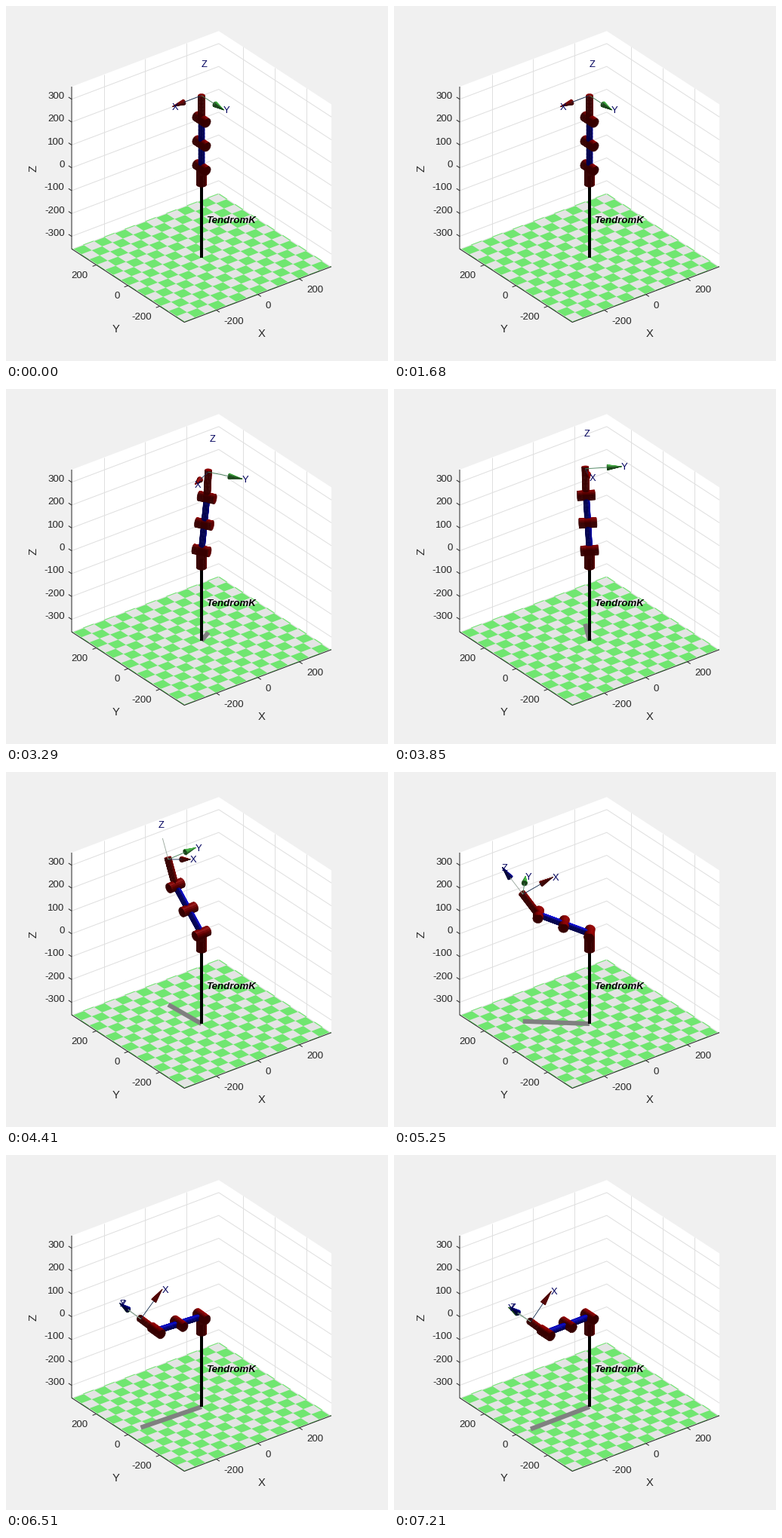
Write a matplotlib script that moves like this. It is 506x471 px and loops after 7770 ms.

```python
import math

import numpy as np
import matplotlib.pyplot as plt
from matplotlib.animation import FuncAnimation
from matplotlib.collections import PolyCollection
from matplotlib.patches import Polygon

W, H, FRAMES, TICK = 506, 471, 111, 70
FIRST_MOVE, TICKS_PER_STEP, PHASE, STEPS = 24, 1.645, 0.4865, 49

# Orthographic projection: world millimetres to stage pixels
REACH = 355
PROJ = np.array([[194.8, -149.2, 0], [-73.8, -97.3, -215.3]]) / (2 * REACH)
CENTRE = np.array([258.5, 225.9])
VIEW = np.array([-0.527, -0.687, 0.5])
LIGHT = np.array([1, 0, 1]) / math.sqrt(2)

RED, BLUE, GREEN = (0.7, 0, 0), (0, 0, 1), (0.3, 0.85, 0.3)
CONE_COLORS = ((0.75, 0, 0), GREEN, (0, 0, 0.7))
LINK, AXIS_LEN, CONE_LEN = 105, 140, 55
UP = np.array([0, 0, 1.0])


def project(points):
    return CENTRE + np.asarray(points, float) @ PROJ.T


def shade(color, normal):
    facing = max(0, normal @ LIGHT)
    mirror = 2 * (normal @ LIGHT) * normal - LIGHT
    shine = 0.12 * max(0, mirror @ VIEW) ** 10 if facing else 0
    return np.clip(np.array(color) * (0.3 + 0.6 * facing) + shine, 0, 1)


def unit(v):
    return v / np.linalg.norm(v)


def ring(axis, sides):
    ref = np.array([0, 1.0, 0]) if abs(axis[1]) < 0.8 else np.array([1.0, 0, 0])
    u = unit(np.cross(axis, ref))
    v = np.cross(axis, u)
    angles = np.arange(sides + 1) * 2 * math.pi / sides
    return np.outer(np.cos(angles), u) + np.outer(np.sin(angles), v)


def facet(out, points, normal, color):
    if normal @ VIEW > 0:
        points = np.array(points)
        out.append((points.mean(axis=0) @ VIEW, project(points), shade(color, normal)))


def cylinder(out, start, end, radius, color, parts=1, sides=20):
    axis = unit(end - start)
    rim = ring(axis, sides)
    cuts = [start + (end - start) * i / parts for i in range(parts + 1)]
    for a, b in zip(rim[:-1], rim[1:]):
        normal = unit(a + b)
        for p, q in zip(cuts[:-1], cuts[1:]):
            facet(out, (p + a * radius, p + b * radius,
                        q + b * radius, q + a * radius), normal, color)
    facet(out, end + rim * radius, axis, color)
    facet(out, start + rim * radius, -axis, color)


def cone(out, base, tip, radius, color):
    axis = unit(tip - base)
    rim = ring(axis, 12)
    slope = radius / np.linalg.norm(tip - base)
    for a, b in zip(rim[:-1], rim[1:]):
        facet(out, (base + a * radius, base + b * radius, tip),
              unit(unit(a + b) + slope * axis), color)
    facet(out, base + rim * radius, -axis, color)


def progress(frame):
    """Quintic time scaling, sampled at the discrete trajectory steps."""
    done = sum(FIRST_MOVE + math.floor(TICKS_PER_STEP * k + PHASE) <= frame
               for k in range(STEPS))
    u = done / STEPS
    return u ** 3 * (10 - 15 * u + 6 * u * u)


def arm(s):
    """Joint positions and the tool frame for trajectory fraction s."""
    azimuth, tilt, tool_tilt = math.pi * s, math.pi / 2 * s, math.pi / 4 * s
    out = np.array([math.cos(azimuth), math.sin(azimuth), 0])
    side = np.array([-out[1], out[0], 0])
    along = math.sin(tilt) * out + math.cos(tilt) * UP
    tool_z = math.sin(tool_tilt) * out + math.cos(tool_tilt) * UP
    tool_x = math.sin(tool_tilt) * UP - math.cos(tool_tilt) * out
    shoulder = 40 * UP
    elbow = shoulder + LINK * along
    wrist = elbow + LINK * along
    tip = wrist + LINK * tool_z
    return (shoulder, elbow, wrist, tip), side, (tool_x, -side, tool_z)


# The small excess keeps rounding from losing a pixel
fig = plt.figure(figsize=((W + 0.01) / 100, (H + 0.01) / 100), dpi=100,
                 facecolor="#f0f0f0")
ax = fig.add_axes([0, 0, 1, 1])
ax.set_xlim(-0.5, W - 0.5)
ax.set_ylim(H - 0.5, -0.5)
ax.axis("off")


def line(points, color, width, z):
    xy = project(points)
    return ax.plot(xy[:, 0], xy[:, 1], color=color, lw=width * 0.72, zorder=z,
                   solid_capstyle="butt")[0]


def text(x, y, label, px=13.3, color="#262626", ha="center", **style):
    return ax.text(x, y, label, fontsize=px * 0.72, color=color, ha=ha,
                   va="center", family="Liberation Sans", zorder=8, **style)


def draw_stage():
    r = REACH
    outline = [(-r, r, r), (r, r, r), (r, -r, r), (r, -r, -r), (-r, -r, -r), (-r, r, -r)]
    ax.add_patch(Polygon(project(outline), fc="white", ec="none", zorder=0))

    for v in range(-300, 301, 100):
        line([(-r, r, v), (r, r, v), (r, -r, v)], "#dfdfdf", 1, 1)
    for v in (-200, 0, 200):
        line([(v, r, -r), (v, r, r)], "#dfdfdf", 1, 1)
        line([(r, v, -r), (r, v, r)], "#dfdfdf", 1, 1)

    floor = Polygon(project([(-r, -r, -r), (r, -r, -r), (r, r, -r), (-r, r, -r)]),
                    fc="#e4e4e4", ec="none", zorder=2)
    ax.add_patch(floor)
    tiles = [project([(x, y, -r), (x + 50, y, -r), (x + 50, y + 50, -r), (x, y + 50, -r)])
             for x in range(-400, 400, 50) for y in range(-400, 400, 50)
             if (x + y) // 50 % 2]
    checker = PolyCollection(tiles, facecolors="#70e670", edgecolors="none", zorder=2.1)
    ax.add_collection(checker)
    checker.set_clip_path(floor)

    dark = "#262626"
    line([(-r, r, r), (-r, r, -r), (-r, -r, -r), (r, -r, -r)], dark, 1, 3)
    for v in (-200, 0, 200):
        line([(v, -r, -r), (v, -r - 20, -r)], dark, 1, 3)
        line([(-r, v, -r), (-r - 18, v, -r)], dark, 1, 3)
        x, y = project((v, -r, -r))
        text(x + 9.5, y + 15.5, str(v), ha="left")
        x, y = project((-r, v, -r))
        text(x - 11, y + 14.5, str(v), ha="right")
    for v in range(-300, 301, 100):
        line([(-r, r, v), (-r, r + 20, v)], dark, 1, 3)
        text(77, project((-r, r, v))[1] - 3.7, str(v), ha="right")

    text(338, 434, "X", 14.7)
    text(145, 428, "Y", 14.7)
    text(36, 215, "Z", 14.7, rotation=90)
    text(265, 284, "TendromK", color="black", ha="left", weight="bold", style="italic")
    line([(0, 0, -r), (0, 0, 0)], "black", 4, 4)


draw_stage()
shadow = line([(0, 0, -REACH)] * 2, "#808080", 6, 3.5)
body = PolyCollection([], linewidths=0.4, zorder=5)
ax.add_collection(body)
axis_lines = [line([(0, 0, 0)] * 2, c, 0.9, 6) for c in ("#1c3454", "#47805a", "#9aa89e")]
axis_labels = [text(0, 0, name, 13, "#00005c", "left") for name in "XYZ"]


def update(frame):
    s = progress(frame)
    (shoulder, elbow, wrist, tip), side, tool_axes = arm(s)
    facets = []

    cylinder(facets, -35 * UP, 35 * UP, 19, RED, 3)
    for joint in (shoulder, elbow, wrist):
        cylinder(facets, joint - 33 * side, joint + 33 * side, 19, RED, 3)
    cylinder(facets, shoulder, elbow, 11.5, BLUE, 7)
    cylinder(facets, elbow, wrist, 11.5, BLUE, 7)
    overshoot = 8 * min(1, 6 * s)
    cylinder(facets, wrist, tip + overshoot * tool_axes[2], 13, RED, 7)

    for i, direction in enumerate(tool_axes):
        base = tip + (AXIS_LEN - CONE_LEN) * direction
        end = tip + AXIS_LEN * direction
        # The Z arrow is washed out by the light while it points upwards
        if i < 2 or s > 0.6:
            cone(facets, base, end, 11, CONE_COLORS[i])
        axis_lines[i].set_data(*project([tip, base]).T)
        axis_lines[i].set_visible(i < 2 or s > 0.4)
        x, y = project(end)
        axis_labels[i].set_position((x - 0.5, y + 1.5))

    facets.sort(key=lambda f: f[0])
    colors = [f[2] for f in facets]
    body.set_verts([f[1] for f in facets])
    body.set_facecolor(colors)
    body.set_edgecolor(colors)

    shadow.set_data(*project([(0, 0, -REACH), (tip[0], tip[1], -REACH)]).T)
    return [shadow, body, *axis_lines, *axis_labels]


anim = FuncAnimation(fig, update, frames=FRAMES, interval=TICK, repeat=True, repeat_delay=0)
plt.show()
```
